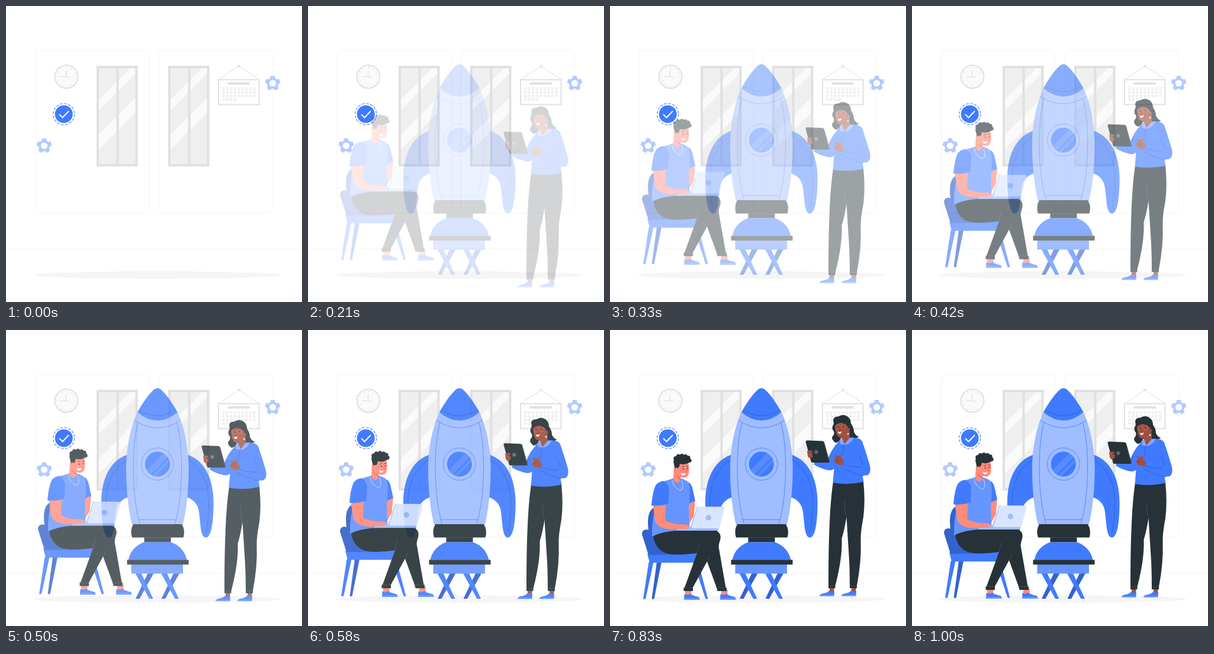
Write an HTML page that moves like this. It is 500 by 500 pixels and loops after 1040 ms.

```html
<!DOCTYPE html>
<html lang="en">
<head>
<meta charset="utf-8">
<title>Rocket launch team</title>
<style>
  html, body { margin: 0; width: 100%; height: 100%; overflow: hidden; background: #fff; }
  svg { display: block; width: 100%; height: 100%; }
  .blue { fill: #407bff; }
  .deep { fill: #3362cc; }
  .mid { fill: #6695ff; }
  .pale { fill: #9fbdff; }
  .dark { fill: #263238; }
  .grey { fill: #e0e0e0; }
  .skin { fill: #ff8b7b; }
  .brown { fill: #a0503f; }
  .line { fill: none; stroke: #407bff; stroke-width: .8; }
  .crease { fill: none; stroke: #2b57b8; stroke-width: .7; stroke-linecap: round; }
  .fine { fill: none; stroke: #263238; stroke-width: .8; stroke-linecap: round; }
  .frame { fill: none; stroke: #f5f5f5; }
</style>
</head>
<body>
<svg viewBox="0 0 500 500">
  <defs>
    <g id="window">
      <path fill="#efefef" d="M154 102h67.500v168h-67.500z"/>
      <path fill="#fafafa" d="M155 160L210 105H218.500V114.500L155 178zM155 219L220 154V179L155 244z"/>
      <path fill="none" stroke="#e0e0e0" stroke-width="4" d="M155 103h65.500v166h-65.500zM188.500 103v166"/>
    </g>
    <g id="gear">
      <circle r="7.600" fill="none" stroke="#b3caff" stroke-width="4"/>
      <g id="teeth" fill="#b3caff"></g>
    </g>
    <g id="fin">
      <path class="blue" d="M208 210C179 217 161 248 161 291C161 321 164 350.500 174 350.500C184 350.500 183 322 186 305C188 292 198 284 209 282z"/>
      <path class="crease" d="M203 220C178 236 169 264 169 292Q169 322 173.500 340"/>
    </g>
    <g id="stand">
      <path class="deep" d="M239.500 411h10L225.500 454h-6.500z"/>
      <path class="blue" d="M218.500 411h10L248.500 454H242z"/>
    </g>
    <g id="manShoe">
      <path class="skin" d="M127 437h11l-1 9h-10z"/>
      <path class="blue" d="M125.500 444Q131 447 136 443.500Q141 447.500 148 448.500Q152 449.500 151.500 453.500H125z"/>
      <path fill="none" stroke="#9fbdff" stroke-width=".7" d="M125.500 451.500H151M137 447l3-1.500"/>
    </g>
    <g id="womanShoe">
      <path class="brown" d="M371 436h8l-1 8h-7z"/>
      <path class="blue" d="M370.500 442Q375 445 379 442.500L378.500 451.500H354Q354 447.500 361 447Q367 446 370.500 442z"/>
      <path fill="none" stroke="#9fbdff" stroke-width=".7" d="M354.500 450H378.500"/>
    </g>
    <clipPath id="port"><circle cx="255.800" cy="226.500" r="21"/></clipPath>
  </defs>

  <!-- room -->
  <rect class="frame" x="49.500" y="74.500" width="192.500" height="275" rx="6"/>
  <rect class="frame" x="258.300" y="74.500" width="192" height="275" rx="6"/>
  <path class="frame" d="M0 410.500H500"/>
  <ellipse cx="255.500" cy="454.500" rx="208.500" ry="6.300" fill="#f5f5f5"/>
  <use href="#window"/>
  <use href="#window" x="121"/>
  <circle cx="102" cy="119.500" r="19.500" fill="#fafafa" stroke="#e0e0e0" stroke-width="2"/>
  <circle cx="102" cy="119.500" r="15.500" fill="none" stroke="#dcdcdc" stroke-width="2.500" stroke-dasharray=".8 7.316" stroke-dashoffset=".4"/>
  <path fill="none" stroke="#dcdcdc" d="M101.500 109V119.500H91.500M101.500 119.500L107.500 121"/>
  <path fill="none" stroke="#e0e0e0" d="M359.500 124L393.500 101.500L427.500 124"/>
  <circle class="grey" cx="393.500" cy="101.500" r="2"/>
  <path fill="#fff" stroke="#e0e0e0" stroke-width="2" d="M359 124.500h68.500v42H359z"/>
  <path class="grey" d="M374.500 129H412v3.800H374.500z"/>
  <g id="days" fill="#f0f0f0"></g>
  <use href="#gear" x="64.500" y="236"/>
  <use href="#gear" x="450.500" y="130.500"/>
  <circle class="blue" cx="97.700" cy="182.700" r="15"/>
  <circle class="line" cx="97.700" cy="182.700" r="18" stroke-dasharray="4.600 2.470" style="stroke-width:1.100"/>
  <path fill="none" stroke="#fff" stroke-width="2" d="M90 183L95.500 188.500L106 177.500"/>

  <g id="rocket">
    <use href="#fin"/>
    <use href="#fin" transform="matrix(-1 0 0 1 511.600 0)"/>
    <path class="pale" d="M213 329C206 303 202.500 262 203 228C204 192 212 160 222 139H289.600C299.600 160 307.600 192 308.600 228C309.100 262 305.600 303 298.600 329z"/>
    <path class="blue" d="M222 139C230 124 242 107 250 100.500Q255.800 96 261.600 100.500C269.600 107 281.600 124 289.600 139Q255.800 167 222 139z"/>
    <path class="crease" d="M225 135.500Q255.800 154 286.600 135.500"/>
    <path class="line" d="M217 152.500Q255.800 178 294.600 152.500M223 156C214 190 213 242 218 285Q221 310 226.500 327.500M288.600 156C297.600 190 298.600 242 293.600 285Q290.600 310 285.100 327.500M223.500 320.300H288"/>
    <circle class="line" cx="255.800" cy="226.500" r="27.300"/>
    <circle class="blue" cx="255.800" cy="226.500" r="21"/>
    <g clip-path="url(#port)" fill="none" stroke="#fff" stroke-opacity=".12">
      <path stroke-width="10" d="M234 247L278 203"/>
      <path stroke-width="4" d="M244 252L284 212"/>
    </g>
    <path class="dark" d="M215 328H297Q303.500 339 299.500 350.500H278.500V358.500H233.500V350.500H213Q209 339 215 328z"/>
    <path fill="none" stroke="#46545c" stroke-width=".7" d="M233.500 350.500h45"/>
    <path class="blue" d="M233 358.500H279Q301 367 305.500 388.500H206.500Q211 367 233 358.500z"/>
    <use href="#stand"/>
    <use href="#stand" x="43.500"/>
    <path class="mid" d="M211.500 396h87.500v15.500h-87.500z"/>
    <path class="dark" d="M204.500 388.300h104v8h-104z"/>
  </g>

  <g id="man">
    <path class="deep" d="M72 299Q64 306 64 322Q64 340 70 352L86 350L84 300zM79 390h8L74.500 452.500H70.500z"/>
    <path class="blue" d="M63 376Q100 378 147 374V391H67zM65.500 390H73.500L60 452.500H56zM141 390h8L165.500 452.500H161.500z"/>
    <path class="deep" d="M54 343Q54 335.500 61 335Q70 335 75 344L84 362L146 370V375Q110 378 65 378z"/>
    <use href="#manShoe"/>
    <use href="#manShoe" x="61"/>
    <path class="skin" d="M132 288L144 285L141.500 312L134 325z"/>
    <path class="mid" d="M92 253Q101 251 107 248.500H119Q131 251 136 260L139 288L133 293L134.500 336Q95 338 71 347Q70 322 77 296z"/>
    <path class="blue" d="M133 255Q138 258 140 268L144 286.500L134 290.500Q136 272 133 255z"/>
    <path class="dark" d="M73 346C90 338 108 337 130 336.500H177Q188 339 186.500 351Q184 358 183.500 364L195.500 433H197V439H181.500L180 433L164 389L140 433V439H124.500V433H126L147 375C120 378 104 379 92 374Q76 366 73 346z"/>
    <path fill="none" stroke="#4a5a62" stroke-width=".7" d="M147 375Q148 366 152 358M164 389L169 379M125 433.500H140M181 433.500H196"/>
    <path class="pale" d="M114 331H184Q183 337 180 337H112z"/>
    <path class="skin" d="M72.500 293L94.500 290L93 320Q104 325 118 326.500L127 326Q134 328 136 331L126 331.500L134 334L112 334.500Q99 336 88 332Q76 327 75.500 316z"/>
    <path class="blue" d="M90 253Q99 257 100 268L98.500 291.500Q84 296 70 294.500Q72 269 78 259Q83 254 90 253z"/>
    <path class="pale" d="M147 296.500H151L139 333H135z"/>
    <path fill="#d9e5ff" d="M150 296.500H190Q194 296.500 193.500 300L185 331Q184.500 333 182 333H140Q137 333 138 330L147 299Q148 296.500 150 296.500z"/>
    <circle class="pale" cx="166.300" cy="315" r="4.700"/>
    <path class="skin" d="M108 229L119 240L119 250Q117 257 113 256Q107 254 107 249z"/>
    <path fill="#eb6f62" d="M111 242Q115 247 119 247V250Q113 249 111 242z"/>
    <path class="skin" d="M112 222Q121 215 132 221Q135 234 132.500 242Q130 248.500 123 247.500Q113 246 111 236z"/>
    <g class="dark">
      <path d="M108.500 213Q122 205 135 216L134 222Q125 227 118 224Q117.500 228 115.500 231L110 232Q106 221 108.500 213z"/>
      <circle cx="111" cy="215" r="3.700"/><circle cx="110.500" cy="221" r="3.200"/>
      <circle cx="115.500" cy="211.500" r="3.600"/><circle cx="121.500" cy="210.500" r="3.500"/>
      <circle cx="127.500" cy="211.500" r="3.500"/><circle cx="132" cy="214" r="3.700"/>
      <circle cx="134.500" cy="218.500" r="3.200"/>
      <circle cx="124" cy="233" r="1"/><circle cx="130.500" cy="232" r="1"/>
    </g>
    <circle class="skin" cx="112.800" cy="234" r="3.400"/>
    <path class="fine" d="M121.500 229.500L125 228.300M129 228L132 228.300"/>
    <path fill="none" stroke="#eb5a50" stroke-width=".8" d="M127.800 233L130 237.500L127.500 238"/>
    <path fill="#fff" d="M119.500 239.500Q124 241.500 128 239.500Q126 244.500 122.500 243.800Q120.300 243 119.500 239.500z"/>
    <path fill="none" stroke="#c6d8ff" d="M105 251.500Q107 264 118.500 269Q126 268 121 252"/>
  </g>

  <g id="woman">
    <path class="dark" d="M377 155Q377 148 386 148Q394 143 401 148Q407 152 407 160Q412 167 412 174Q415 181 420.500 182Q414 187.500 404 185L390 184Q389 191 381 192.500Q373.500 187 375.500 182Q380 178 378 173Q374 169 376.500 163Q379 160 377 155z"/>
    <use href="#womanShoe"/>
    <use href="#womanShoe" x="37"/>
    <path class="dark" d="M377 258H428Q431.500 290 428 318Q423 344 423.500 358Q425 392 417 434V438H405V434Q405 400 403 374L399.500 318Q396 340 391.500 354Q393 386 380.500 434V438H369V434Q369 375 370.500 340Q372 292 377 258z"/>
    <path fill="none" stroke="#4a5a62" stroke-width=".7" d="M399.500 318Q395 304 397 290M369 434H380.500M405 434H417"/>
    <path class="blue" d="M387 190Q397 186 410 184Q422 183 426 190Q431 204 439 231Q441.500 245 434 247.500L426.500 248L428.500 258.500Q402 264.500 376.500 260L378.500 236Q375 240 367 238.500Q353 235 344 229L347 222Q357 226 367 223Q374 202 387 190z"/>
    <path class="brown" d="M391 174L405 170L405 185Q401 193 394 195Q391 190 392 184z"/>
    <path fill="#7fa6ff" d="M389 187L392 184L396 195L405 184L411.500 183.500Q409 191 401 195L394 196L388 194z"/>
    <path class="crease" d="M395 196L392 214M393 229Q408 234 424 234M391 234Q410 245 428 248.500M367 223L375 213M420 213Q426 222 426 230"/>
    <path class="brown" d="M381 160Q390 153 400 158L404 169Q401 180 393 182.500Q386 185 383 179Q379.500 170 381 160z"/>
    <path class="dark" d="M378 162Q376 150 390 148.500Q404 147 407 161Q411 170 406 180Q405 173 402 169Q401 162 395 159.500Q386 157 381 163z"/>
    <circle class="brown" cx="402.500" cy="170" r="2.800"/>
    <circle cx="402" cy="177.500" r="1.500" fill="#d9e5ff"/>
    <path class="fine" d="M383.500 161L386 160M393 160L397 160.500"/>
    <circle class="dark" cx="386" cy="165.500" r=".9"/>
    <circle class="dark" cx="394" cy="165" r=".9"/>
    <g fill="none" stroke="#ef6f61" stroke-width=".6">
      <circle cx="385" cy="165.500" r="3.900"/><circle cx="394.500" cy="165" r="3.900"/>
      <path d="M398.400 164.500L403 165.500"/>
    </g>
    <path fill="none" stroke="#7a3128" stroke-width=".8" d="M389 166L387 171L389.500 171.500"/>
    <path fill="#fff" d="M385 173.500Q388 175.500 391.500 173Q390.500 177.500 387.500 177.500Q385.500 177 385 173.500z"/>
    <path class="dark" d="M333 188.500L359 189.500Q361.500 190 362 192L371 224Q371 226 369 226H342Q340 226 339.500 224L330.500 191Q330.500 188.500 333 188.500z"/>
    <path fill="none" stroke="#4f5b62" stroke-width=".8" d="M361.500 192L370 224.500"/>
    <circle cx="348.300" cy="208" r="3.200" fill="#5b676d"/>
    <path class="brown" d="M333 206L341 205.500Q343.500 207 341 208.500L337 209.500L342 210Q344 212 341 213L343 215Q342.500 217 339 217L341 220Q336 219 334 215zM379 213.500Q383 213 386 215L389 212.500Q391 213 390 217L395 223Q396 228 391 230L384 229Q378 226 378.500 221L382 219z"/>
    <path fill="none" stroke="#7a3128" stroke-width=".6" d="M380 221L385 219.500M380.500 224L386 222.500"/>
  </g>
</svg>
<script>
const get = id => document.getElementById(id);
const LOOP = 1040, STEPS = 25, SLIDE = 30;

get("teeth").innerHTML = Array.from({ length: 5 }, (_, i) =>
  `<path d="M-3.900 -8L-3.500 -12.600H3.500L3.900 -8z" transform="rotate(${i * 72})"/>`).join("");

get("days").innerHTML = Array.from({ length: 31 }, (_, i) =>
  `<rect x="${365 + i % 9 * 6.5}" y="${137.3 + Math.floor(i / 9) * 6.1}" width="4.600" height="4.600" rx=".8"/>`).join("");

const bezier = (a, b, s) => 3 * a * s * (1 - s) ** 2 + 3 * b * s * s * (1 - s) + s ** 3;

// Overshooting ease: cubic-bezier(.36, -.01, .5, 1.38)
function ease(x) {
  let lo = 0, hi = 1;
  for (let i = 0; i < 24; i++) {
    const s = (lo + hi) / 2;
    if (bezier(.36, .5, s) < x) lo = s; else hi = s;
  }
  return bezier(-.01, 1.38, hi);
}

function pose(id, opacity, dy) {
  get(id).setAttribute("opacity", opacity);
  get(id).setAttribute("transform", `translate(0 ${dy})`);
}

function draw(now) {
  // The picture advances at 24 steps per second, starting after a short hold.
  const step = Math.min(STEPS - 1, Math.floor((now % LOOP + 4.5) * 24 / 1000));
  const p = step < 2 ? 0 : ease((step + 1) / STEPS);
  const opacity = Math.max(0, Math.min(1, p));
  pose("rocket", opacity, 0);
  pose("man", opacity, SLIDE * (p - 1));
  pose("woman", opacity, SLIDE * (1 - p));
}

const start = performance.now();
function tick() {
  draw(performance.now() - start);
  requestAnimationFrame(tick);
}
tick();
</script>
</body>
</html>
```
